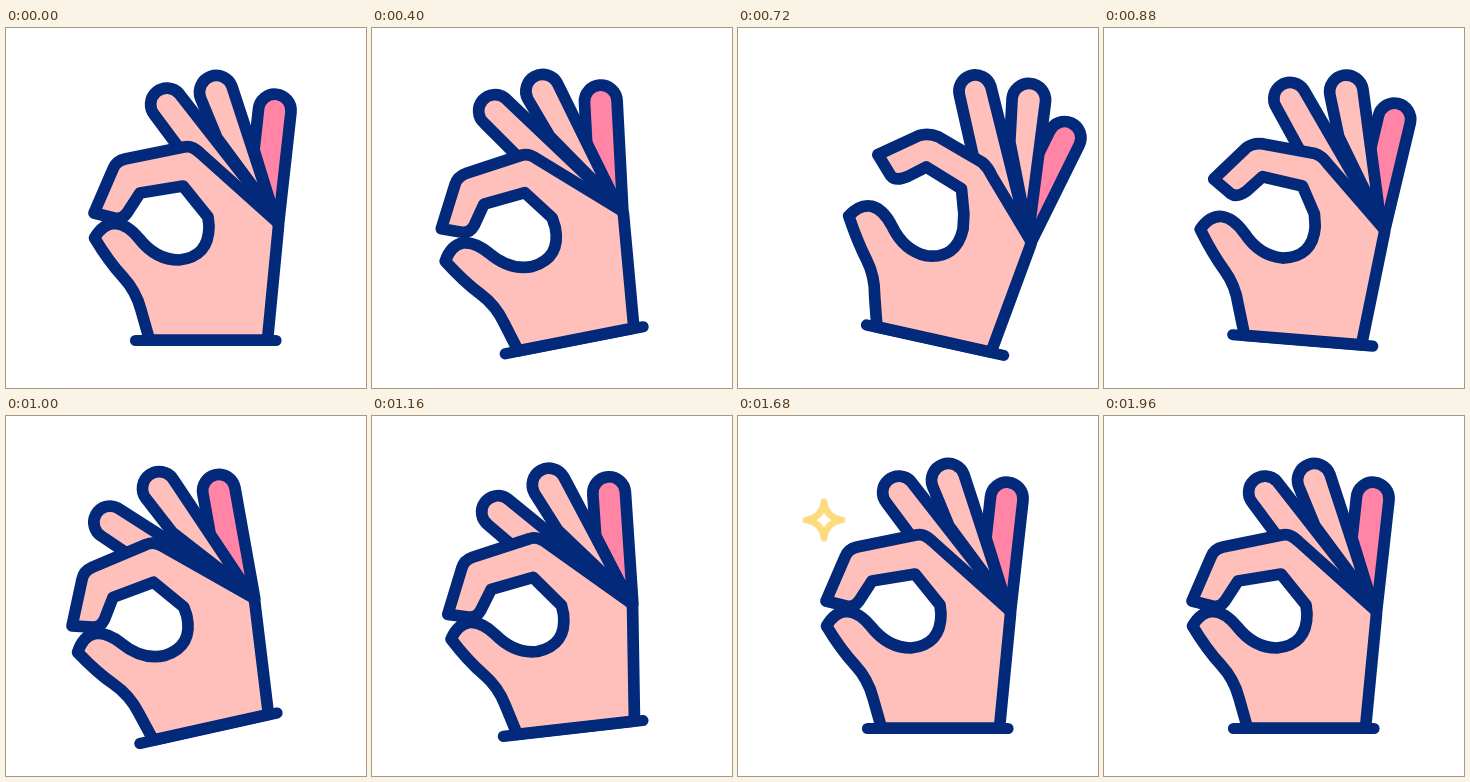
These frames come from a looping animation (360 px wide and 360 px high, 2 s). An HTML page:

```html
<!DOCTYPE html>
<html lang="en">
<head>
<meta charset="utf-8">
<title>OK hand</title>
<style>
  html, body { margin: 0; width: 100%; height: 100%; overflow: hidden; background: #fff; }
  svg { display: block; width: 100%; height: 100%; }
  path { stroke-linejoin: round; stroke-linecap: round; }
  #hand { fill: #ffc0bb; stroke: #02297a; stroke-width: 11.7; }
  #star { fill: none; stroke: #ffdb80; stroke-width: 12; }
</style>
</head>
<body>
<svg viewBox="0 0 360 360">
  <path id="star" d="M86 72Q90 100 118 104Q90 108 86 136Q82 108 54 104Q82 100 86 72Z"/>
  <g id="hand">
    <path id="pinky" fill="#ff84a5" d="M268 187L248 122L252.5 81A16.3 16.3 0 0 1 285 84L272.5 196Z"/>
    <path id="ring" d="M268 187L211 110L194.5 70A16.5 16.5 0 0 1 226 58.5Z"/>
    <path id="middle" d="M268 187L185 136L148.5 87A16.3 16.3 0 0 1 173 65.5Z"/>
    <path id="palm"/>
    <path d="M129.5 312.5H270" stroke-width="11.2"/>
  </g>
</svg>
<script>
const LOOP = 2000;
const $ = id => document.getElementById(id);

// Each track is a list of [time, value] keys joined by sine easing.
const TILT = [[260, 0], [540, -22], [765, 16], [1040, -14], [1310, 4], [1500, 0]];
const OPEN = [[260, 0], [765, 1], [1040, 0]];
const STAR = [[1180, 0], [1340, 1], [1580, 1], [1800, 0]];
const splay = (peak, back) => [[240, 0], [740, peak], [1060, back], [1360, 0]];
const FINGERS = {
  middle: splay(11.5, -8.5),
  ring: splay(13, -4.5),
  pinky: splay(7.5, -5)
};

function valueAt(keys, t) {
  if (t <= keys[0][0]) return keys[0][1];
  for (let i = 1; i < keys.length; i++) {
    const [t0, v0] = keys[i - 1], [t1, v1] = keys[i];
    if (t < t1) return v0 + (v1 - v0) * (1 - Math.cos(Math.PI * (t - t0) / (t1 - t0))) / 2;
  }
  return keys[keys.length - 1][1];
}

// The index finger moves from pinched to open while the wrist shifts a little.
function palmPath(open) {
  const p = (x0, y0, x1, y1) => `${x0 + (x1 - x0) * open} ${y0 + (y1 - y0) * open} `;
  return 'M' + p(143.5, 312, 140, 312) + 'L' + p(135, 282, 131, 282) +
    'Q' + p(130, 263, 127, 263) + p(117, 249, 115.5, 249) +
    'Q103 234 88.5 210Q97 195.5 109 195.5' +
    'Q121 196 133 210.5Q150 232 173 232Q203 229 203 198' +
    'L' + p(202, 189, 200.5, 183) + 'L' + p(177, 158, 193, 159) +
    'L' + p(134, 165, 154, 145) + 'L' + p(121, 185, 138, 158) +
    'Q' + p(116, 192, 127, 166) + p(108, 190, 121, 161) +
    'L' + p(88, 185, 104, 143) + 'L' + p(107, 141, 140, 116) +
    'Q' + p(110, 133, 149, 111) + p(119, 131, 160, 113) +
    'L' + p(178, 119, 208, 129) + 'Q' + p(186, 117, 215, 133) + p(194, 125, 220, 140) +
    'L271 194L272.5 198L' + p(261.5, 312, 257, 312) + 'Z';
}

function draw(t) {
  const open = valueAt(OPEN, t);
  $('hand').setAttribute('transform', `rotate(${valueAt(TILT, t)} 200 300)`);
  for (const id in FINGERS)
    $(id).setAttribute('transform',
      `translate(0 ${3.5 * open}) rotate(${valueAt(FINGERS[id], t)} 268 187)`);
  $('palm').setAttribute('d', palmPath(open));
  const size = valueAt(STAR, t);
  $('star').setAttribute('transform', `translate(86 104) scale(${size}) translate(-86 -104)`);
  $('star').setAttribute('visibility', size > 0 ? 'visible' : 'hidden');
}

const start = performance.now();
function tick() {
  draw((performance.now() - start) % LOOP);
  requestAnimationFrame(tick);
}
tick();
</script>
</body>
</html>
```
